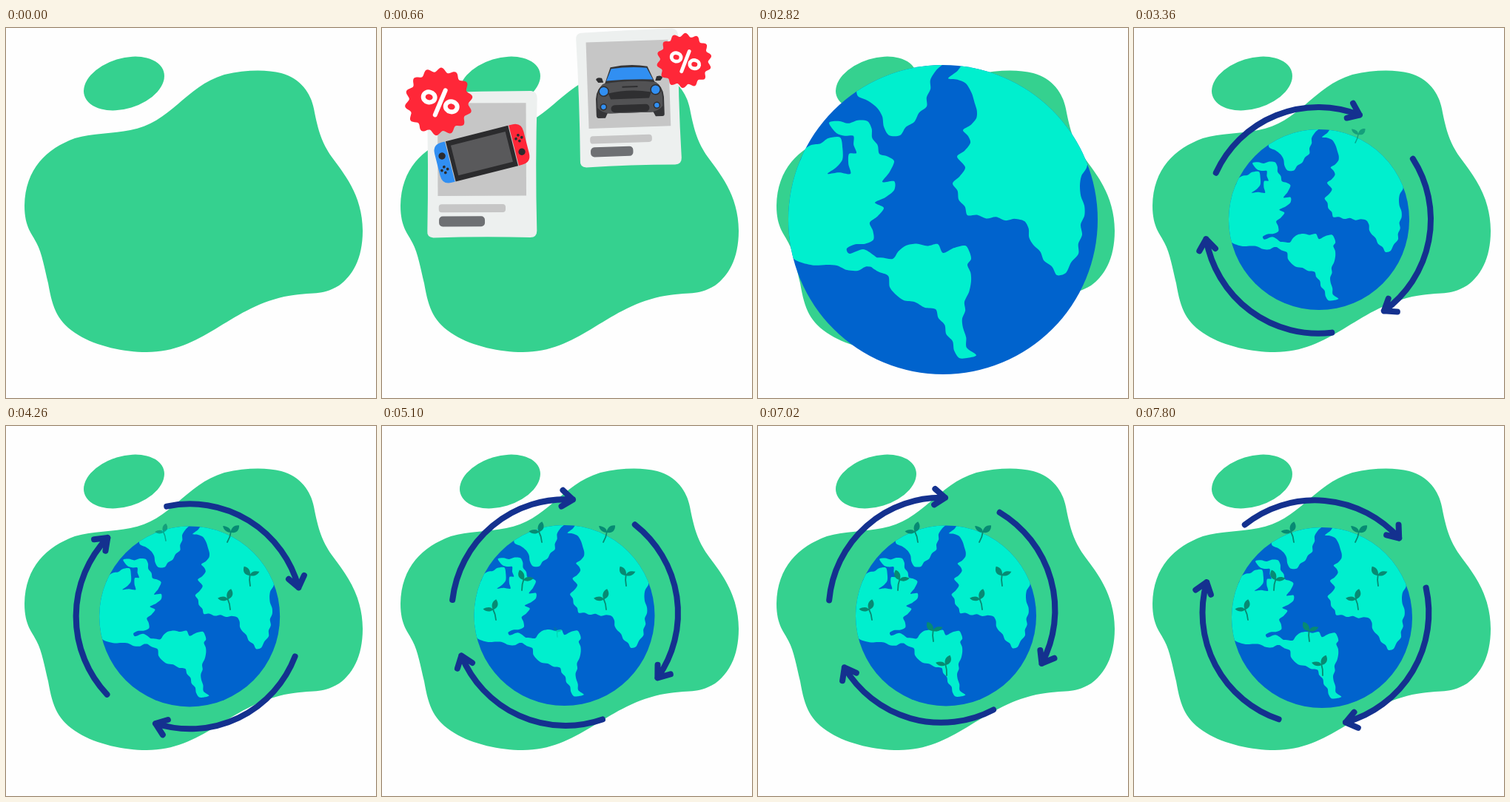
Recreate the animation shown at these times as an HTML page. Size 500 px wide and 500 px high, loop 7830 ms.

```html
<!DOCTYPE html>
<html lang="en">
<head>
<meta charset="utf-8">
<title>Offers and a green planet</title>
<style>
html, body { margin: 0; width: 100%; height: 100%; overflow: hidden; background: #fefefe; }
svg { display: block; width: 100vw; height: 100vh; }
</style>
</head>
<body>
<svg viewBox="0 0 500 500">
  <defs>
    <clipPath id="disc"><circle cx="250" cy="259" r="209"/></clipPath>
    <g id="percent" fill="none" stroke="#fff" stroke-width="6" stroke-linecap="round">
      <ellipse cx="-13" cy="-6" rx="8" ry="7" transform="rotate(12 -13 -6)"/>
      <ellipse cx="17" cy="7" rx="8" ry="7" transform="rotate(12 17 7)"/>
      <path d="M9 -15L-5 18"/>
    </g>
    <g id="pad"><circle cx="-4" r="1.9"/><circle cx="4" r="1.9"/><circle cy="-4" r="1.9"/><circle cy="4" r="1.9"/></g>
    <path id="arrow" d="M-151.8 -8A152 152 0 0 1 0 -152M-14 -163.5L0 -152L-14.5 -142"/>
    <g id="sprout">
      <path d="M0 0Q1 -8 -1 -15" fill="none" stroke="#078a73" stroke-width="1.8" stroke-linecap="round"/>
      <path d="M-1 -14C-5 -12 -11 -13 -14 -18C-8 -20 -2 -19 -1 -14ZM-1 -14C-3 -21 1 -26 6 -27C9 -20 6 -15 -1 -14Z" fill="#078a73"/>
    </g>
  </defs>

  <g fill="#35d18f">
    <path d="M25 240C26 190 55 163 93 149C117 142 145 143 168 138C222 129 242 79 295 63C325 56 352 56 372 61C398 68 412 88 416 109C422 140 427 155 440 174C455 195 482 225 482 274C482 312 468 335 450 348C425 363 418 355 376 363C300 380 265 438 190 438C160 438 122 430 98 415C70 398 63 380 57 345C52 325 49 305 41 290C36 279 25 270 25 240Z"/>
    <ellipse cx="159.5" cy="75" rx="56" ry="34" transform="rotate(-17 159.5 75)"/>
  </g>

  <g id="shop">
    <g class="card" data-box="60 87 150 198" data-badge="77 101 1">
      <g transform="translate(135 171.5) rotate(-14)">
        <path d="M-44.5 -28H-49Q-62 -28 -62 -15V15Q-62 28 -49 28H-44.5Z" fill="#318ff2"/>
        <path d="M44.5 -28H49Q62 -28 62 -15V15Q62 28 49 28H44.5Z" fill="#ff2738"/>
        <path d="M-43.5 -28H43.500V28H-43.5Z" fill="#2b2b2d"/>
        <path d="M-38 -21H38V21H-38Z" fill="#59595b"/>
        <g fill="#2b2b2d">
          <circle cx="-53" cy="-10" r="4.7"/><use href="#pad" x="-54" y="9"/>
          <circle cx="53" cy="11" r="4.7"/><use href="#pad" x="53.5" y="-8"/>
        </g>
      </g>
    </g>
    <g class="card" data-box="264 20 139 184" data-badge="410 64 .81">
      <path d="M302 91L310 70Q335 65 360 70L369 91Q380 97 381 112V135Q381 138 378 138H369L366 132H304L301 138H292Q289 138 289 134V112Q290 97 302 91Z" fill="#353537"/>
      <path d="M299 92Q335 87 371 92Q378 98 379 112V124Q374 131 362 132H308Q296 131 291 124V112Q292 98 299 92Z" fill="#525254"/>
      <path d="M304 88L311 72Q335 69 359 72L367 88Q335 86 304 88Z" fill="#318ff2"/>
      <path d="M290 86Q291 82 298 84L300 90H293ZM380 86Q379 82 372 84L370 90H377Z" fill="#2f2f31"/>
      <path d="M306 105Q335 99 364 105L361 113H309Z" fill="#2f2f31"/>
      <path d="M325 97H346" stroke="#2f2f31" stroke-width="2"/>
      <rect x="309" y="121" width="52" height="10" rx="5" fill="#2f2f31"/>
      <g fill="#318ff2" stroke="#2f2f31" stroke-width="1.5">
        <circle cx="300" cy="102" r="6.5"/><circle cx="370" cy="102" r="6.5"/>
        <circle cx="299" cy="123" r="4"/><circle cx="371" cy="123" r="4"/>
      </g>
    </g>
    <g class="card" data-box="238 237 176 235" data-badge="413 260 .93">
      <path d="M294 280Q305 272 322 272Q323 293 340 293Q355 292 357 279Q376 284 381 295Q404 340 411 380Q413 392 403 393Q399 393 398 388Q380 364 371 330L365 384Q364 390 356 390Q315 388 284 378Q280 376 281 370L291 317Q268 348 248 366Q242 369 236 363Q234 359 238 354Q250 322 294 280Z" fill="#007cff"/>
    </g>
  </g>

  <g id="planet">
    <g id="globe">
      <circle cx="250" cy="259" r="209" fill="#0063cd"/>
      <g id="land" clip-path="url(#disc)" fill="#00efce"></g>
    </g>
    <g id="arrows" fill="none" stroke="#14318f" stroke-width="8" stroke-linecap="round" stroke-linejoin="round">
      <use href="#arrow"/>
      <use href="#arrow" transform="rotate(122.7)"/>
      <use href="#arrow" transform="rotate(238.6) scale(1.012)"/>
    </g>
    <g id="sprouts"></g>
  </g>
</svg>
<script>
const LOOP = 7830, SHOP_END = 2430;
const $ = id => document.getElementById(id);
const nums = s => s.split(/[ ,]+/).map(Number);
const clamp = x => Math.max(0, Math.min(1, x));
const span = (t, from, length) => clamp((t - from) / length);
const easeOut = x => 1 - (1 - x) ** 3;
const easeInOut = x => x < .5 ? 2 * x * x : 1 - 2 * (1 - x) ** 2;
const mix = (a, b, p) => a + (b - a) * p;

function add(parent, tag, attrs, first) {
  const el = document.createElementNS('http://www.w3.org/2000/svg', tag);
  for (const k in attrs) el.setAttribute(k, attrs[k]);
  parent.insertBefore(el, first ? parent.firstChild : null);
  return el;
}

// Closed Catmull-Rom curve through the points
function smooth(p) {
  const at = i => p[(i + p.length) % p.length];
  return 'M' + p[0] + p.map((b, i) => {
    const a = at(i - 1), c = at(i + 1), e = at(i + 2);
    const c1 = b.map((v, k) => v + (c[k] - a[k]) / 7);
    const c2 = c.map((v, k) => v - (e[k] - b[k]) / 7);
    return `C${c1} ${c2} ${c}`;
  }).join('') + 'Z';
}

// Breaks long edges of an outline into small alternating bays
function coast(text) {
  const key = text.split(' ').map(nums);
  return smooth(key.flatMap(([x, y], i) => {
    const [x2, y2] = key[(i + 1) % key.length];
    const length = Math.hypot(x2 - x, y2 - y), n = Math.max(1, Math.round(length / 13));
    return Array.from({ length: n }, (_, k) => {
      const bay = k ? (k % 2 ? 1.8 : -1.8) / length : 0;
      return [mix(x, x2, k / n) + (y2 - y) * bay, mix(y, y2, k / n) - (x2 - x) * bay];
    });
  }));
}

for (const outline of [
  '134,80 135,92 161,108 177,145 192,145 228,106 233,70 252,46 200,30',
  '279,46 257,68 281,75 293,102 295,122 277,138 287,155 269,174 280,188 263,210 283,253 360,261 372,293 404,334 416,331 433,305 441,240 435,213 446,176 470,100 350,20',
  '62,165 95,149 111,148 114,178 94,197 125,197 123,170 133,169 129,146 106,142 96,128 148,126 164,170 184,180 168,208 184,207 184,219 158,236 170,243 151,263 156,286 120,298 124,305 142,299 167,317 135,328 92,320 62,318 30,300 20,250',
  '150,312 182,312 200,294 243,292 250,304 280,294 288,312 283,320 288,342 279,370 277,405 282,432 295,442 272,446 240,380 197,368 178,350 176,335 150,320'
]) add($('land'), 'path', { d: coast(outline) });

// Scalloped disc
const star = 'M' + Array.from({ length: 168 }, (_, i) => {
  const a = i / 84 * Math.PI, r = 43 + 3 * Math.cos(14 * a);
  return [r * Math.cos(a), r * Math.sin(a)].map(v => v.toFixed(1));
}).join('L') + 'Z';

// Picture, light bar and dark bar as fractions of a card: x, y, width, height
const panels = [[.112, .854, .413, .071], [.11, .772, .602, .056], [.102, .082, .797, .633]];

const cards = [...document.querySelectorAll('.card')].map(el => {
  const [x, y, w, h] = nums(el.dataset.box), r = x + w, b = y + h;
  panels.forEach(([px, py, pw, ph], k) => add(el, 'rect', {
    x: x + px * w, y: y + py * h, width: pw * w, height: ph * h,
    rx: k < 2 ? 5 - k : 0, fill: k ? '#c6c6c6' : '#6e7073'
  }, true));
  add(el, 'path', { fill: '#edf0ef', d:
    `M${x + 8} ${y + 2}Q${x + w / 2} ${y} ${r - 8} ${y}Q${r} ${y + 1} ${r} ${y + 10}Q${r - 3} ${y + h / 2} ${r - 1} ${b - 9}` +
    `Q${r - 1} ${b} ${r - 10} ${b}Q${x + w / 2} ${b - 2} ${x + 9} ${b}Q${x} ${b - 1} ${x + 1} ${b - 9}` +
    `Q${x + 3} ${y + h / 2} ${x + 1} ${y + 12}Q${x} ${y + 3} ${x + 8} ${y + 2}Z` }, true);
  const [bx, by, s] = nums(el.dataset.badge);
  const badge = add(el, 'g', { transform: `translate(${bx} ${by}) scale(${s})` });
  add(badge, 'path', { d: star, fill: '#ff2738', transform: 'rotate(-8)' });
  add(badge, 'use', { href: '#percent' });
  return { el, cx: x + w / 2, cy: y + h / 2 };
});
// start, duration, vertical offset, tilt
const entries = [[0, 800, -350, -40], [180, 780, -310, -35], [820, 530, 320, 35]];

// base x, base y, tilt, mirror
const sprouts = [
  [299, 157, 23, 1], [330, 216, -5, -1], [303, 248, -10, 1], [216, 157, -12, 1],
  [189, 222, 6, -1], [154, 262, -12, 1], [237, 291, -5, -1], [255, 337, -3, 1]
].map(place => ({ place, el: add($('sprouts'), 'use', { href: '#sprout' }) }));

// Eased value between the stops of a drift
const stops = [3360, 5100, 6270, 7800];
function drift(t, values) {
  let i = 0;
  while (i < 2 && t > stops[i + 1]) i++;
  const p = span(t, stops[i], stops[i + 1] - stops[i]);
  return mix(values[i], values[i + 1], (1 - Math.cos(Math.PI * p)) / 2);
}

function drawShop(t) {
  cards.forEach(({ el, cx, cy }, i) => {
    const [start, length, dy, tilt] = entries[i];
    const left = 1 - easeOut(span(t, start, length));
    el.setAttribute('transform', `translate(0 ${dy * left}) rotate(${tilt * left} ${cx} ${cy})`);
  });
}

function drawPlanet(t) {
  const size = mix(1.72, 1, easeInOut(span(t, 2790, 450))) / 1.713;
  const x = drift(t, [250, 246.5, 254, 254]), y = drift(t, [259, 256, 254, 259]);
  $('globe').setAttribute('transform', `translate(${x} ${y}) scale(${size}) translate(-250 -259)`);
  $('globe').setAttribute('opacity', span(t, 2490, 270));

  const p = span(t, 2850, 360), turn = 21.5 + .0595 * (t - 3360);
  const ringX = drift(t, [249, 248, 250.5, 244.5]);
  const ringY = 253.5 + 5.5 * Math.cos((t - 3500) / 6000 * 2 * Math.PI);
  $('arrows').setAttribute('transform', `translate(${ringX} ${ringY}) scale(${mix(1.45, 1, easeOut(p))}) rotate(${turn})`);
  $('arrows').setAttribute('opacity', p);

  sprouts.forEach(({ el, place: [x, y, tilt, flip] }, i) => {
    const q = span(t, 3240 + 300 * i, 200), s = 1 - (1 - q) ** 2;
    el.setAttribute('transform', `translate(${x} ${y - 12 * (1 - s)}) rotate(${tilt}) scale(${s * flip} ${s})`);
    el.setAttribute('opacity', clamp(q * 1.15));
  });
}

const begin = performance.now();
function frame() {
  const t = (performance.now() - begin) % LOOP, shop = t < SHOP_END;
  $('shop').style.display = shop ? '' : 'none';
  $('planet').style.display = shop ? 'none' : '';
  (shop ? drawShop : drawPlanet)(t);
  requestAnimationFrame(frame);
}
frame();
</script>
</body>
</html>
```
